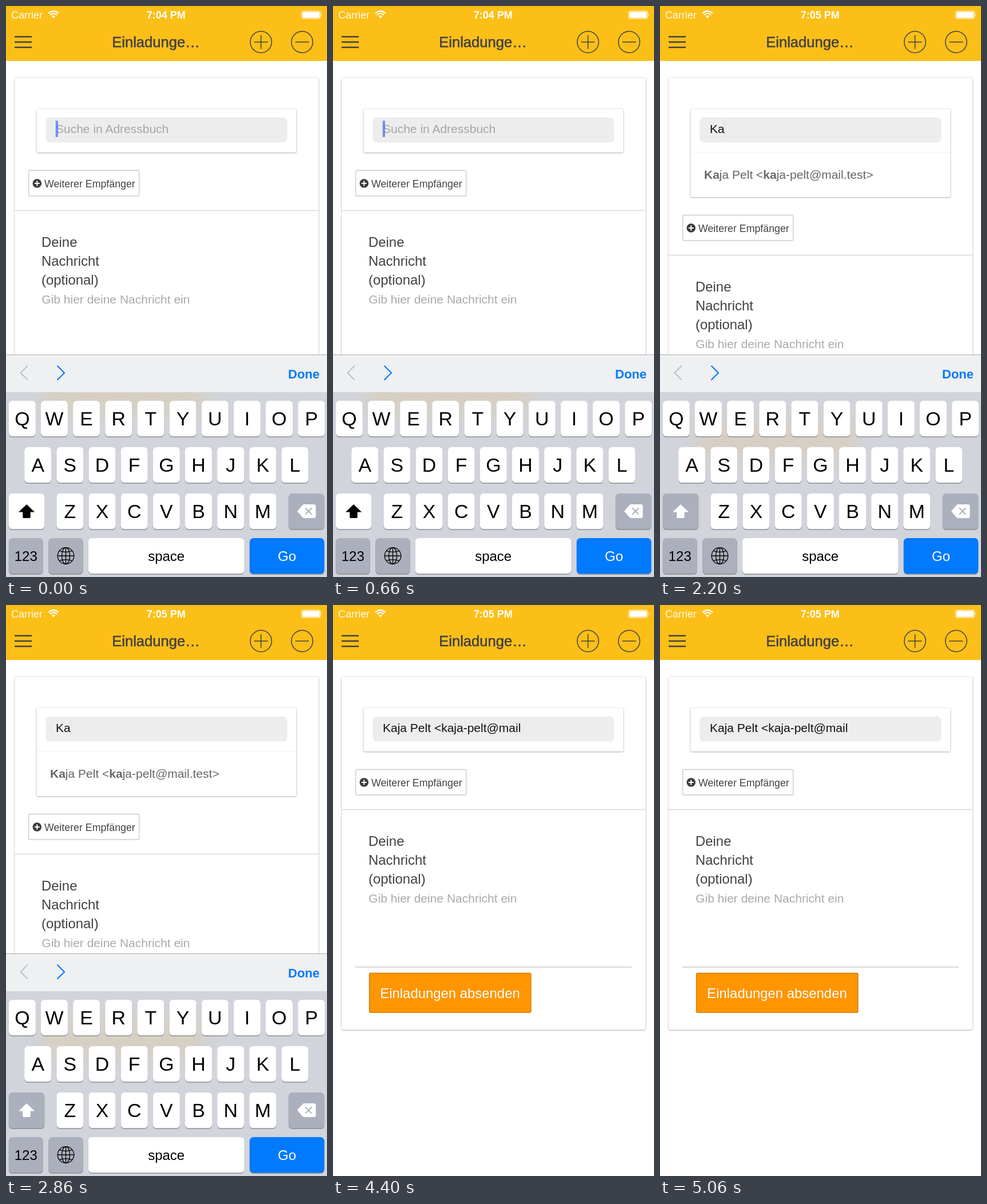
Animation of 561x998 px, one loop 5500 ms. Source, as an HTML page:

```html
<!DOCTYPE html>
<html lang="de">
<head>
<meta charset="utf-8">
<title>Einladungen</title>
<style>
html, body { margin: 0; width: 100%; height: 100%; overflow: hidden; background: #fff; }
svg { display: block; width: 100vw; height: 100vh; font-family: "Liberation Sans", Arial, sans-serif; white-space: pre; }
.card { fill: #fff; filter: drop-shadow(0 1.3px 1px rgba(0,0,0,.24)) drop-shadow(0 0 .9px rgba(0,0,0,.2)); }
.mid { text-anchor: middle; }
.line { fill: none; stroke: #414141; }
.keyShadow { fill: #898c92; }
</style>
</head>
<body>
<svg id="stage" viewBox="0 0 561 998" xmlns="http://www.w3.org/2000/svg">
  <defs>
    <filter id="blur" x="-30%" y="-80%" width="160%" height="260%"><feGaussianBlur stdDeviation="15"/></filter>
    <clipPath id="keysArea"><rect y="675" width="561" height="323"/></clipPath>
  </defs>
  <rect width="561" height="998" fill="#fff"/>

  <g id="page">
    <rect id="card" class="card" x="15" y="125.5" width="531.5" height="617" rx="3"/>
    <rect id="searchCard" class="card" x="53.5" y="180" width="454" height="76" rx="2"/>
    <rect x="69.5" y="195" width="422" height="43.5" rx="6.5" fill="#ededed"/>
    <text id="query" x="87" y="222.3" font-size="21"></text>
    <rect id="caret" y="200.5" height="28.5" fill="#426bf2"/>
    <g id="suggestion">
      <rect id="highlight" x="53.5" y="255" width="454" height="78" fill="#d8d8d8"/>
      <path id="rule" d="M54 255.5H507" stroke="#f1f1f1"/>
      <text x="77" y="301.5" font-size="21" fill="#666"><tspan font-weight="700">Ka</tspan>ja Pelt &lt;<tspan font-weight="700">ka</tspan>ja-pelt@mail.test&gt;</text>
    </g>
    <g id="below">
      <rect x="39.7" y="287.5" width="193" height="44.5" rx="2" fill="#fff" stroke="#ccc" stroke-width="1.4"/>
      <circle cx="54.3" cy="310" r="7.8" fill="#3b3b3b"/>
      <path d="M49.8 310h9M54.3 305.5v9" stroke="#fff" stroke-width="2"/>
      <text x="67" y="316.5" font-size="17.8" fill="#414141">Weiterer Empfänger</text>
      <path d="M15 357.5H546.5" stroke="#d9d9d9" stroke-width="1.5"/>
      <g font-size="23.9" fill="#414141">
        <text x="62" y="421.2">Deine</text>
        <text x="62" y="454.2">Nachricht</text>
        <text x="62" y="487.2">(optional)</text>
      </g>
      <text x="62.3" y="520" font-size="21" fill="#a9a9a9">Gib hier deine Nachricht ein</text>
      <path d="M39 632.7H522" stroke="#ccc" stroke-width="1.4"/>
      <rect x="63.5" y="643.3" width="282.5" height="69.2" rx="2.5" fill="#ff9500" stroke="#c67605" stroke-width="1.2"/>
      <text class="mid" x="204.5" y="687" font-size="23.9" fill="#fff">Einladungen absenden</text>
    </g>
  </g>

  <g id="header">
    <rect width="561" height="96" fill="#fcbf18"/>
    <g fill="#fff" font-size="18">
      <text x="9" y="22" fill-opacity=".92">Carrier</text>
      <text id="clock" class="mid" x="279.7" y="21.7" font-weight="700"></text>
      <path d="M79.7 18.1Q83 15.2 86.3 18.1L83 21.6Z"/>
      <path d="M77 15.8Q83 10.6 89 15.8M74.2 12.8Q83 5.2 91.8 12.8" fill="none" stroke="#fff" stroke-width="2.2"/>
      <rect x="516.6" y="8.8" width="33" height="13.4" rx="2.5" fill="none" stroke="#fff" stroke-width=".9"/>
      <rect x="518" y="10.2" width="30.2" height="10.6" rx="1.2"/>
      <path d="M550.8 13.2q2 2.3 0 4.6z"/>
    </g>
    <path class="line" d="M15 53.7h30M15 63h30M15 72.3h30" stroke-width="2.5"/>
    <text class="mid" x="262" y="71.8" font-size="25.6" fill="#414141" stroke="#414141" stroke-width=".55">Einladunge…</text>
    <g class="line" stroke-width="1.5">
      <circle cx="445.6" cy="63" r="18.7"/><circle cx="517.5" cy="63" r="18.7"/>
      <path d="M433.6 63h24M445.6 51v24M505.5 63h24"/>
    </g>
  </g>

  <g id="keyboard">
    <rect y="609" width="561" height="66" fill="#eff0f1"/>
    <path d="M0 609.5H561" stroke="#acadaf" stroke-width="1.2"/>
    <path d="M38 628.7L25.5 641.2 38 653.7" fill="none" stroke="#b9bbbe" stroke-width="1.9"/>
    <path d="M89.5 628.7L102 641.2 89.5 653.7" fill="none" stroke="#007aff" stroke-width="2.1"/>
    <text x="548" y="651" font-size="22" font-weight="700" text-anchor="end" fill="#007aff">Done</text>
    <rect y="675" width="561" height="323" fill="#d1d4db"/>
    <g clip-path="url(#keysArea)">
      <rect id="glow" x="63" y="643" width="283" height="70" fill="#ffb020" opacity=".13" filter="url(#blur)"/>
    </g>
    <g id="keys"></g>
    <path id="shiftArrow" d="M36 871L50 884.5H42.7V893.5Q42.7 895 41.2 895H30.8Q29.3 895 29.3 893.5V884.5H22Z"/>
    <path d="M509 883L517.5 873Q519 871 521.5 871H538Q541.5 871 541.5 874.5V891.5Q541.5 895 538 895H521.5Q519 895 517.5 893Z" fill="#fff"/>
    <path d="M523 877.3l11.4 11.4M534.4 877.3l-11.4 11.4" stroke="#a5a9b3" stroke-width="1.8"/>
    <g fill="none" stroke="#000" stroke-width="1.3">
      <circle cx="104.5" cy="961" r="14.3"/>
      <ellipse cx="104.5" cy="961" rx="7" ry="14.3"/>
      <path d="M104.5 946.7v28.6M90.2 961h28.6M93.3 952.3q11.2 4 22.4 0M93.3 969.7q11.2-4 22.4 0"/>
    </g>
  </g>
</svg>
<script>
const $ = id => document.getElementById(id);
const GREY = "#acb0bc";
const SCENE_MS = 1100;

function add(tag, attrs, text = "") {
  const node = document.createElementNS("http://www.w3.org/2000/svg", tag);
  for (const name in attrs) node.setAttribute(name, attrs[name]);
  node.textContent = text;
  return $("keys").appendChild(node);
}

function addKey(x, y, width, label = "", fill = "#fff", size = 33.8, color = "#000") {
  const box = { x, width, height: 62.3, rx: 6.5 };
  add("rect", { ...box, y: y + 1.5, class: "keyShadow" });
  const face = add("rect", { ...box, y, fill });
  const baseline = y + 31.3 + size * 0.36;
  add("text", { class: "mid", x: x + width / 2, y: baseline, "font-size": size, fill: color }, label);
  return face;
}

[["QWERTYUIOP", 4.8, 690], ["ASDFGHJKL", 32.2, 771], ["ZXCVBNM", 88.4, 852]].forEach(([letters, x, y]) =>
  [...letters].forEach((letter, i) => addKey(x + i * 56.15, y, 47, letter)));

const shiftKey = addKey(4.8, 852, 62.5);
addKey(493.8, 852, 62.5, "", GREY);
addKey(4.8, 930, 60, "123", GREY, 24);
addKey(74.3, 930, 60.5, "", GREY);
addKey(143.8, 930, 272.7, "space", "#fff", 24);
addKey(425.8, 930, 130.5, "Go", "#007aff", 24, "#fff");

const scenes = [
  { clock: "7:04 PM", query: "Suche in Adressbuch", hint: true, shift: true, caret: [86.7, 4.3, 0.7] },
  { clock: "7:07 PM", query: "K" },
  { clock: "7:05 PM", query: "Ka", open: true, caret: [111.5, 3, 0.06] },
  { clock: "7:05 PM", query: "Ka", open: true, pressed: true },
  { clock: "7:05 PM", query: "Kaja Pelt <kaja-pelt@mail", sent: true }
];

const show = (id, on) => $(id).setAttribute("visibility", on ? "inherit" : "hidden");

function render(scene) {
  const shift = scene.open ? 78 : 0;
  const [caretX, caretWidth, caretOpacity] = scene.caret || [0, 0, 0];
  $("clock").textContent = scene.clock;
  $("query").textContent = scene.query;
  $("query").setAttribute("fill", scene.hint ? "#a6a6a6" : "#111");
  $("caret").setAttribute("x", caretX);
  $("caret").setAttribute("width", caretWidth);
  $("caret").setAttribute("opacity", caretOpacity);
  $("card").setAttribute("height", 617 + shift);
  $("searchCard").setAttribute("height", 76 + shift);
  $("below").setAttribute("transform", `translate(0 ${shift})`);
  $("glow").setAttribute("transform", `translate(0 ${shift})`);
  shiftKey.setAttribute("fill", scene.shift ? "#fff" : GREY);
  $("shiftArrow").setAttribute("fill", scene.shift ? "#000" : "#fff");
  show("suggestion", scene.open);
  show("highlight", scene.pressed);
  show("rule", scene.open && !scene.pressed);
  show("keyboard", !scene.sent);
}

const start = performance.now();
let current;
function tick() {
  const elapsed = performance.now() - start;
  const scene = scenes[Math.floor(elapsed / SCENE_MS) % scenes.length];
  if (scene !== current) render(current = scene);
  requestAnimationFrame(tick);
}
tick();
</script>
</body>
</html>
```
